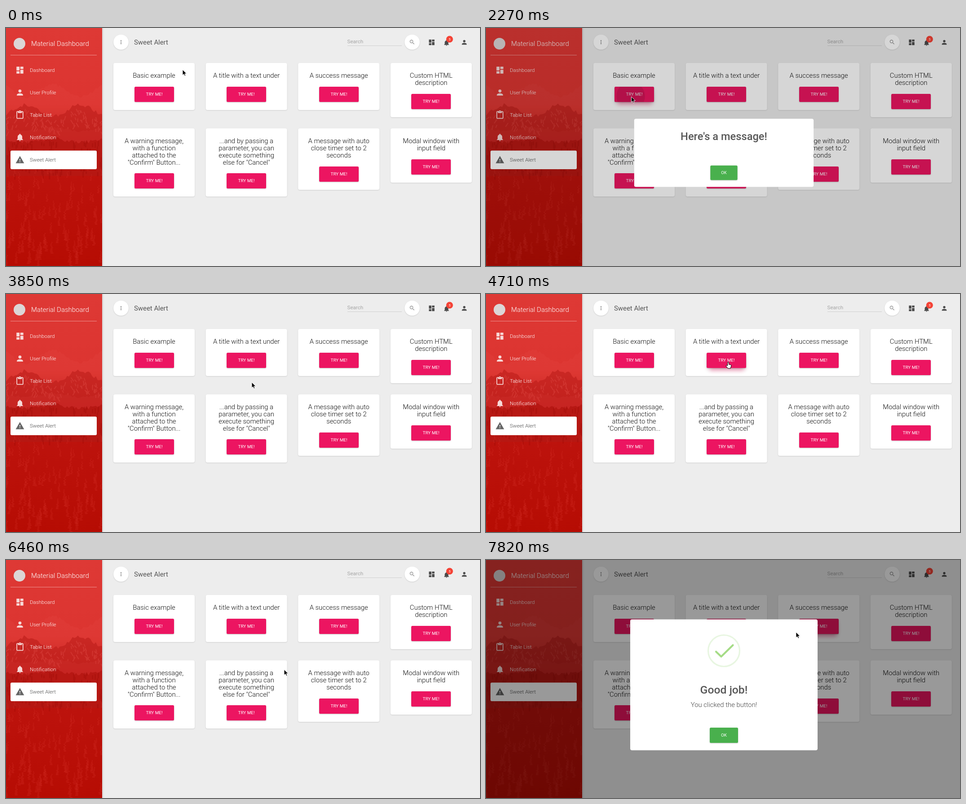
An HTML page that plays this animation: 1055 px wide and 531 px high, repeating every 8000 ms.

```html
<!DOCTYPE html>
<html lang="en">
<head>
<meta charset="utf-8">
<title>Dashboard alerts</title>
<style>
html, body { margin: 0; width: 100%; height: 100%; overflow: hidden; background: #ededed; }
svg { display: block; width: 1055px; height: 531px; font-family: Roboto, "Open Sans", sans-serif; cursor: default; }
text { white-space: pre; }
.card { fill: #fff; filter: drop-shadow(0 1px 1px rgba(0,0,0,.13)); }
.btn { filter: drop-shadow(0 1px 1px rgba(0,0,0,.22)); }
.glow { filter: blur(5px); }
</style>
</head>
<body>
<svg id="stage" viewBox="0 0 1055 531" xmlns="http://www.w3.org/2000/svg">
  <defs>
    <linearGradient id="sky" x2="0" y2="1">
      <stop offset="0" stop-color="#de3935"/><stop offset=".32" stop-color="#dc3430"/>
      <stop offset=".46" stop-color="#c51f1a"/><stop offset=".6" stop-color="#bd130d"/>
      <stop offset="1" stop-color="#b60c03"/>
    </linearGradient>
    <linearGradient id="edge">
      <stop offset="0" stop-opacity=".09"/><stop offset="1" stop-opacity="0"/>
    </linearGradient>
    <clipPath id="side"><rect width="214" height="531"/></clipPath>
  </defs>
</svg>
<script>
const stage = document.getElementById("stage");
const LOOP = 8000;
const CENTER = 529.5, MIDDLE = 278.5;
const PINK = "#ec1561", GREEN = "#49b04d", TEAL = "#00bcd4";

const ICONS = {
  dashboard: "M3 13h8V3H3zM3 21h8v-6H3zM13 21h8V11h-8zM13 3v6h8V3z",
  person: "M12 12a4 4 0 1 0 0-8 4 4 0 0 0 0 8zm0 2c-2.7 0-8 1.3-8 4v2h16v-2c0-2.7-5.3-4-8-4z",
  paste: "M19 2h-4.2a3 3 0 0 0-5.6 0H5a2 2 0 0 0-2 2v16a2 2 0 0 0 2 2h14a2 2 0 0 0 2-2V4a2 2 0 0 0-2-2zm-7 0a1 1 0 1 1 0 2 1 1 0 0 1 0-2zm7 18H5V4h2v3h10V4h2z",
  bell: "M12 22a2 2 0 0 0 2-2h-4a2 2 0 0 0 2 2zm6-6v-5c0-3.1-1.6-5.6-4.5-6.3V4a1.5 1.5 0 0 0-3 0v.7C7.6 5.4 6 7.9 6 11v5l-2 2v1h16v-1z",
  warning: "M1 21h22L12 2zm12-3h-2v-2h2zm0-4h-2v-4h2z",
  search: "M15.5 14h-.8l-.3-.3A6.5 6.5 0 1 0 13.7 14.4l.3.3v.8l5 5 1.5-1.5zm-6 0a4.5 4.5 0 1 1 0-9 4.5 4.5 0 0 1 0 9z",
  more: "M12 8a2 2 0 1 0 0-4 2 2 0 0 0 0 4zm0 2a2 2 0 1 0 0 4 2 2 0 0 0 0-4zm0 6a2 2 0 1 0 0 4 2 2 0 0 0 0-4z"
};

function add(parent, tag, attrs = {}, content) {
  const el = document.createElementNS("http://www.w3.org/2000/svg", tag);
  set(el, attrs);
  if (content !== undefined) el.textContent = content;
  return parent.appendChild(el);
}
function set(el, attrs) {
  for (const key in attrs) el.setAttribute(key, attrs[key]);
}
const group = (parent, attrs) => add(parent, "g", attrs);
const box = (parent, x, y, width, height, rx, fill, more) =>
  add(parent, "rect", { x, y, width, height, rx, fill, ...more });
const label = (parent, x, y, size, weight, fill, str, anchor = "start") =>
  add(parent, "text", { x, y, "font-size": size, "font-weight": weight, fill, "text-anchor": anchor }, str);
const icon = (parent, name, cx, cy, size, fill) =>
  add(parent, "path", { d: ICONS[name], fill, transform: `translate(${cx - size / 2} ${cy - size / 2}) scale(${size / 24})` });

let seed = 77;
const rnd = () => (seed = (seed * 16807) % 2147483647) / 2147483647;
const range = (lo, hi) => lo + rnd() * (hi - lo);

// Two crests, 120 px apart, at x = 45 and x = 165.
const crest = (x, height) => -height * Math.cos((x - 45) / 120 * 2 * Math.PI);

function buildLandscape(side) {
  const ridge = (y, height, rough, fill, opacity) => {
    let d = "M0 330";
    for (let x = 0; x <= 216; x += 4) d += `L${x} ${(y + crest(x, height) + range(-rough, rough)).toFixed(1)}`;
    add(side, "path", { d: d + "V330Z", fill, opacity });
  };
  const strokes = (count, step, stroke, width, opacity) => {
    let d = "";
    for (let i = 0; i < count; i++) d += step();
    add(side, "path", { d, stroke, "stroke-width": width, fill: "none", opacity });
  };
  ridge(140, -14, 3, "#e8504a", .15);
  ridge(184, 13, 4, "#bd1d19", .6);
  strokes(110, () => {
    const x = range(0, 214), y = 192 + crest(x, 13) + range(0, 36);
    return `M${x} ${y}l${range(-7, 7)} ${range(4, 11)}`;
  }, "#e2504b", 2, .35);
  ridge(226, -4, 3, "#cf332e", .3);
  ridge(251, -4, 4, "#ad100b", .6);
  strokes(130, () => `M${range(0, 214)} ${range(250, 325)}v${range(5, 16)}`, "#970904", 3, .3);
  strokes(130, () => {
    const depth = rnd(), x = range(0, 214), y = 300 + depth * 215;
    let spike = "";
    for (let k = 0; k < 4 + depth * 5; k++) spike += `M${x + range(-2, 1) - k * .3} ${y + k * 3}h${1.5 + depth + k * .5}`;
    return spike;
  }, "#d9382f", 1.6, .35);
}

function buildSidebar() {
  box(stage, 214, 0, 5, 531, 0, "url(#edge)");
  const side = group(stage, { "clip-path": "url(#side)" });
  box(side, 0, 0, 214, 531, 0, "url(#sky)");
  buildLandscape(side);
  add(side, "circle", { cx: 30, cy: 35, r: 13, fill: "#dcd6d6" });
  label(side, 56, 40, 15, 300, "#fff", "Material Dashboard");
  box(side, 10, 60, 192, 1, 0, "#fff", { opacity: .45 });
  box(side, 10, 273.5, 192, 41.5, 3, "#fff");
  [["dashboard", "Dashboard"], ["person", "User Profile"], ["paste", "Table List"],
   ["bell", "Notification"], ["warning", "Sweet Alert"]].forEach(([name, str], i) => {
    const y = 94 + i * 50, active = i === 4;
    icon(side, name, 31, y, 20.5, active ? "#666" : "#f7d9d8");
    label(side, 53, y + 4.3, 11.6, 300, active ? "#444" : "#fff", str);
  });
}

function buildHeader() {
  const disc = cx => add(stage, "circle", { cx, cy: 31.5, r: 16.8, class: "card" });
  disc(256);
  icon(stage, "more", 256, 31.5, 13.5, "#777");
  label(stage, 285, 37, 14.9, 400, "#555", "Sweet Alert");
  label(stage, 759.5, 33.5, 11.6, 400, "#a5a5a5", "Search");
  box(stage, 760, 39, 121, 1, 0, "#cfcfcf");
  disc(904);
  icon(stage, "search", 904, 31.5, 14, "#888");
  icon(stage, "dashboard", 947.5, 32, 16.5, "#4a4a4a");
  icon(stage, "bell", 980.5, 33, 16, "#4a4a4a");
  add(stage, "circle", { cx: 987.3, cy: 25, r: 7.6, fill: "#f44336" });
  label(stage, 987.3, 28, 7.6, 400, "#fff", "5", "middle");
  icon(stage, "person", 1020, 32, 16, "#4a4a4a");
}

function buildButton(parent, x, y, w, fill, str) {
  const glow = group(parent, { opacity: 0 });
  box(glow, x + 7, y + 14, w - 12, 26, 3, fill, { class: "glow", opacity: .35 });
  box(glow, x, y + 4, w, 34, 3, "#000", { class: "glow", opacity: .1 });
  box(parent, x, y, w, 34, 2.5, fill, { class: "btn" });
  label(parent, x + w / 2, y + 20, 9.9, 400, "#fff", str, "middle");
  return glow;
}

const CARDS = [
  "Basic example", "A title with a text under", "A success message", "Custom HTML|description",
  "A warning message,|with a function|attached to the|\"Confirm\" Button...",
  "...and by passing a|parameter, you can|execute something|else for \"Cancel\"",
  "A message with auto|close timer set to 2|seconds", "Modal window with|input field"
];
const cardX = i => 239 + (i % 4) * 205.6;
const buttonX = i => Math.floor(cardX(i) + 47);

function buildCard(str, i) {
  const lines = str.split("|"), x = cardX(i), y = i < 4 ? 78 : 224;
  const extra = Math.round((lines.length - 1) * 15.8);
  box(stage, x, y, 181, 105 + extra, 4, "#fff", { class: "card" });
  lines.forEach((s, k) => label(stage, x + 90.5, y + 33.2 + k * 15.8, 14.85, 300, "#111", s, "middle"));
  return buildButton(stage, buttonX(i), y + 53 + extra, 88, PINK, "TRY ME!");
}

function buildRipple(i) {
  const clip = add(stage.querySelector("defs"), "clipPath", { id: "rip" + i });
  box(clip, buttonX(i), 131, 88, 34, 2.5);
  return add(group(stage, { "clip-path": `url(#rip${i})` }), "circle");
}

// aim: the card button is reached; open, close: animations start; hover: OK is reached
const DIALOGS = [
  { aim: 740, open: 2044, hover: 3010, close: 3500, height: 159, title: "Here's a message!", fill: GREEN },
  { aim: 4190, open: 4784, hover: 5300, close: 5899, height: 176, title: "Good job!", text: "You clicked the button!", fill: TEAL },
  { aim: 6840, open: 6904, hover: LOOP, close: LOOP, height: 292, title: "Good job!", text: "You clicked the button!", fill: GREEN, check: true }
];
function buildDialog(d) {
  const top = MIDDLE - d.height / 2;
  const base = top + (d.check ? 165.5 : 50);
  d.g = group(stage);
  box(d.g, 321, top, 417, d.height, 4, "#fff");
  label(d.g, CENTER, base, 24.7, 500, "#575757", d.title, "middle");
  if (d.text) label(d.g, CENTER, base + 30, 14.9, 300, "#444", d.text, "middle");
  d.glow = buildButton(d.g, CENTER - 31.5, base + (d.text ? 76 : 59), 63, d.fill, "OK");
  if (d.check) {
    const line = { fill: "none", stroke: "#a5dc86", "stroke-linecap": "round", "stroke-linejoin": "round" };
    d.ring = add(d.g, "circle", { ...line, cx: CENTER, cy: 202.5, r: 35, "stroke-width": 3.2 });
    d.tick = add(d.g, "path", { ...line, d: "M512 204.5L523.5 215.5 549.5 190", pathLength: 1, "stroke-width": 4.2 });
  }
}

buildSidebar();
buildHeader();
const glows = CARDS.map(buildCard);
const ripples = DIALOGS.map((d, i) => buildRipple(i));
const shade = box(stage, 0, 0, 1055, 531, 0, "#000");
DIALOGS.forEach(buildDialog);
const arrow = add(stage, "path", {
  d: "M0 0V12.3L2.9 9.7 4.8 14 6.8 13.1 5 8.9H8.8Z", fill: "#000", stroke: "#fff", "stroke-width": .9
});
const hand = add(stage, "path", {
  d: "M-1.4 8V1.2a1.4 1.3 0 0 1 2.8 0V5L5.4 5.8Q7.2 6.3 7 8L5.2 14H-.6L-4.4 9.3Q-5.2 7.2-3.6 7.1Z",
  fill: "#fff", stroke: "#000", "stroke-linejoin": "round"
});

const clamp = v => Math.max(0, Math.min(1, v));
const ease = v => v * v * (3 - 2 * v);
const within = (t, from, to) => t >= from && t < to;
const visible = (el, on) => set(el, { visibility: on ? "visible" : "hidden" });

// The screen refreshes in bursts of evenly spaced steps: first, last, count.
const BURSTS = [[0, 0, 1], [360, 990, 6], [1980, 2960, 7], [3130, 3130, 1],
  [3610, 4560, 9], [4710, 5530, 6], [6010, 6990, 8], [7140, 7820, 5]];
function refreshTime(now) {
  const [first, last, count] = BURSTS.filter(b => b[0] <= now).pop();
  if (now >= last) return last;
  const gap = (last - first) / (count - 1);
  return first + Math.floor((now - first) / gap) * gap;
}

// Pointer trips: depart, arrive, x, y.
const TRIPS = [[260, 990, 322, 152], [2100, 2960, 534, 323], [3600, 3850, 547, 197],
  [3850, 4440, 539, 152], [4800, 5530, 545.5, 331.5], [6020, 6860, 698, 151], [7000, 7820, 690, 161]];
function pointerAt(t) {
  let px = 393, py = 93;
  for (const [depart, arrive, x, y] of TRIPS) {
    const k = ease(clamp((t - depart) / (arrive - depart)));
    px += (x - px) * k;
    py += (y - py) * k;
  }
  return [px, py];
}

// Springy entrance: .7 -> 1.05 -> .95 -> 1
function popScale(age) {
  return .7 + .35 * clamp(age / 135) - .1 * clamp((age - 135) / 105) + .05 * clamp((age - 240) / 60);
}

function drawDialog(d, t) {
  const age = t - d.open, left = clamp((t - d.close) / 150);
  const shown = age >= 0 && left < 1;
  set(d.g, { display: shown ? "inline" : "none" });
  if (!shown) return 0;
  const scale = popScale(age) - left / 2;
  set(d.g, {
    transform: `translate(${CENTER} ${MIDDLE}) scale(${scale}) translate(${-CENTER} ${-MIDDLE})`,
    opacity: 1 - left
  });
  set(d.glow, { opacity: clamp((t - d.hover) / 120) });
  if (d.check) {
    const drawn = ease(clamp((age - 380) / 420));
    set(d.ring, { opacity: age > 150 ? .25 : 0 });
    set(d.tick, { opacity: drawn > 0 ? 1 : 0, "stroke-dasharray": `${drawn} 2` });
  }
  return .4 * clamp(age / 250);
}

function drawCard(d, i, t) {
  const age = t - d.open, [cx, cy] = pointerAt(d.open);
  set(glows[i], { opacity: within(t, d.aim, d.open + 1000) ? clamp((t - d.aim) / 150) : 0 });
  set(ripples[i], { cx, cy, r: Math.max(0, age) * .32, opacity: .13 * clamp(1 - age / 450) });
}

function draw(now) {
  const t = refreshTime(now);
  const [x, y] = pointerAt(t);
  const pointing = DIALOGS.some(d => within(t, d.aim, d.open - 65) || within(t, d.hover, d.close + 150));
  visible(arrow, !pointing);
  visible(hand, pointing);
  [arrow, hand].forEach(el => set(el, { transform: `translate(${x} ${y})` }));
  DIALOGS.forEach((d, i) => drawCard(d, i, t));
  set(shade, { opacity: Math.max(...DIALOGS.map(d => drawDialog(d, t))) });
}

const start = performance.now();
function frame() {
  draw((performance.now() - start) % LOOP);
  requestAnimationFrame(frame);
}
frame();
</script>
</body>
</html>
```
